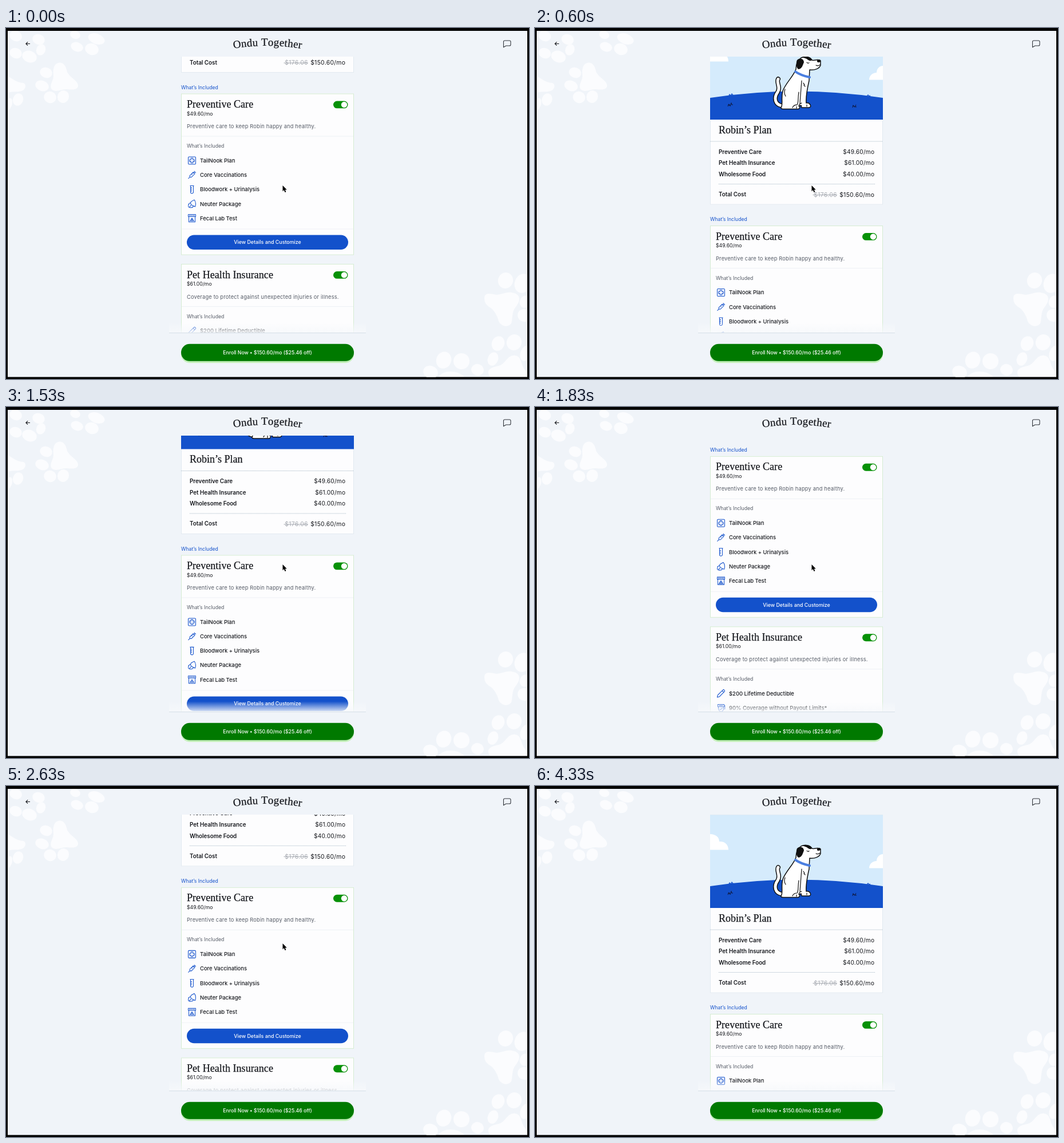
Recreate the animation shown at these times as an HTML page with a canvas. Size 914 by 613 pixels, loop 4.36 s.

```html
<!DOCTYPE html>
<html lang="en">
<head>
<meta charset="utf-8">
<title>Pet plan</title>
<style>
html, body { margin: 0; width: 100%; height: 100%; overflow: hidden; background: #000; }
canvas { display: block; width: 914px; height: 613px; }
</style>
</head>
<body>
<canvas id="stage"></canvas>
<script>
const W = 914, H = 613, LOOP = 4360;
const BG = '#f0f4f9', INK = '#16181d', GREY = '#555b66', BLUE = '#1351cb', CARD = '#fdfdfe';
const LEFT = 306, RIGHT = 608;
const SANS = 'Inter, sans-serif', SERIF = '"Liberation Serif", serif';

const canvas = document.getElementById('stage');
const dpr = window.devicePixelRatio || 1;
canvas.width = W * dpr;
canvas.height = H * dpr;
const c = canvas.getContext('2d');

// Scroll moves: start, end, from, to
const MOVES = [
  [0, 840, 283.5, 0],
  [1193, 1943, 0, 330],
  [2268, 3200, 330, 0]
];

function scrollAt(t) {
  let pos = MOVES[0][2];
  for (const [t0, t1, a, b] of MOVES) {
    if (t < t0) break;
    const u = Math.min(1, (t - t0) / (t1 - t0));
    pos = a + (b - a) * (1 - Math.cos(Math.PI * u)) / 2;
  }
  return pos;
}

function text(str, x, y, size, o = {}) {
  const serif = o.serif;
  c.font = `${o.weight || 400} ${size}px ${serif ? SERIF : SANS}`;
  c.letterSpacing = (o.gap || 0) + 'px';
  c.textAlign = o.align || 'left';
  c.fillStyle = o.color || INK;
  const base = y + size * (serif ? 0.3 : 0.36);
  c.fillText(str, x, base);
  if (serif) {
    c.lineWidth = 0.25;
    c.strokeStyle = c.fillStyle;
    c.strokeText(str, x, base);
  }
}

function box(x, y, w, h, r, fill) {
  c.beginPath();
  c.roundRect(x, y, w, h, r);
  c.fillStyle = fill;
  c.fill();
}

function line(x0, y, x1, color, dash = [], width = 1) {
  c.beginPath();
  c.setLineDash(dash);
  c.moveTo(x0, y);
  c.lineTo(x1, y);
  c.strokeStyle = color;
  c.lineWidth = width;
  c.stroke();
  c.setLineDash([]);
}

function shape(d, fill, stroke, width = 1.5) {
  const p = new Path2D(d);
  if (fill) { c.fillStyle = fill; c.fill(p); }
  if (stroke) {
    c.strokeStyle = stroke;
    c.lineWidth = width;
    c.stroke(p);
  }
}

function oval(x, y, rx, ry, rot, fill) {
  c.beginPath();
  c.ellipse(x, y, rx, ry, rot, 0, 7);
  c.fillStyle = fill;
  c.fill();
}

function card(y0, y1, edge) {
  c.fillStyle = CARD;
  c.fillRect(LEFT, y0, RIGHT - LEFT, y1 - y0);
  c.strokeStyle = edge;
  c.lineWidth = 1;
  c.strokeRect(LEFT + 0.5, y0 + 0.5, RIGHT - LEFT - 1, y1 - y0 - 1);
}

const TOES = [
  [17, 14, 11, 9], [57, 20, 11, 9], [61, 38, 8, 10], [41, 50, 13, 10], [17, 44, 11, 9],
  [124, 33, 11, 8], [150, 37, 12, 10], [158, 19, 15, 9], [121, 12, 9, 7],
  [70, 78, 11, 9], [63, 101, 12, 9], [77, 121, 11, 10], [100, 120, 10, 11],
  [21, 125, 9, 11], [4, 134, 6, 12],
  [873, 441, 13, 14], [903, 446, 14, 17], [907, 478, 9, 11], [906, 502, 12, 11],
  [860, 551, 11, 13], [888, 549, 13, 14], [851, 578, 9, 12], [908, 568, 9, 14],
  [765, 580, 13, 15], [796, 582, 14, 14], [742, 601, 13, 11], [824, 597, 11, 10]
];

function paws() {
  const white = '#fbfcfe';
  for (const [x, y, rx, ry] of TOES) oval(x, y, rx, ry, 0.35, white);
  shape('M91 61C101 58 105 68 107 77C112 87 126 92 126 101C125 110 112 107 104 107C94 108 86 113 80 107C75 101 82 93 83 85C82 75 82 64 91 61Z', white);
  shape('M0 82C10 87 17 95 30 96C37 98 34 108 27 110C17 113 9 109 0 115Z', white);
  shape('M836 472C836 461 847 464 857 466C868 465 876 459 888 463C901 467 898 478 891 487C883 496 886 508 883 516C877 524 865 521 861 512C858 501 853 493 846 488C839 484 836 479 836 472Z', white);
  shape('M846 609C837 597 849 592 861 590C873 588 876 570 890 572C902 574 899 588 907 597L914 609Z', white);
  shape('M756 609C765 596 790 598 801 609Z', white);
}

const ICONS = {
  plus: 'M-6.5-5q0-1.5 1.5-1.5h10q1.5 0 1.5 1.5v10q0 1.5-1.5 1.5h-10q-1.5 0-1.5-1.5ZM-1.6-4.2h3.2v2.6h2.6v3.2h-2.6v2.6h-3.2v-2.6h-2.6v-3.2h2.6Z',
  needle: 'M-6.5 6.5L-3.8 3.8M-3.8 3.8L-3.8 .9L2.2-5L5-2.2L-.9 3.8ZM3.6-3.6L5.4-5.4M3.7-6.8L6.8-3.7M-.8-2l1.5 1.5M1.2-4l1.5 1.5',
  tube: 'M-3.5-6.5h7M-2.5-6.5V4.5a2.5 2.5 0 0 0 5 0V-6.5M-2.5-2.8h2.6M-2.5 0h2.6M-2.5 2.8h2.6',
  cone: 'M-1.5-4L4-7C7-4 7 2 5.5 5L0 2.5C-2.5 1.5-3-2-1.5-4ZM-2-2C-6-1-7 3-6 5.5C-3 7.5 1 7 3 4M-5 1l-1.5-1M-1.8 2.5l-2.5 3',
  jar: 'M-6.5-6.5h13v3.5h-13ZM-3.5-6.5v3.3M0-6.5v3.3M3.5-6.5v3.3M-5.5-3V6.5h11V-3M-3.2 4.5L0-.2L3.2 4.5ZM-1 2.8h2',
  pen: 'M-6.5 6.5L-5.6 2.8L3.4-6.2Q4.6-7.2 5.8-6Q7.2-4.7 6.2-3.4L-2.8 5.6ZM2-4.8L4.8-2',
  shield: 'M-5.5-6h11v4h-11ZM-3.5-4h7M-4.5-2C-5 3-3 5.5 0 7C4 5.5 5 2 4.5-2M-2.2 1.5L-.5 3L2.6-.2M5.5-4h1.3v6h-1.5'
};

function item(icon, label, y) {
  c.save();
  c.translate(325, y);
  shape(ICONS[icon], null, BLUE, 1.05);
  c.restore();
  text(label, 339, y, 9.45, { weight: 500 });
}

function section(top, bottom, title, price, note, items) {
  card(top, bottom, '#d5ecd2');
  text(title, 316, top + 19.2, 18, { serif: true, gap: 0.05 });
  text(price, 316, top + 35, 8.7);
  text(note, 316, top + 57.3, 9.25, { color: GREY, gap: 0.2 });
  line(LEFT + 1, top + 74.5, RIGHT - 1, '#eef1f5');
  text('What’s Included', 316, top + 91.5, 8.7, { color: GREY });
  box(572, top + 13, 25.5, 12.8, 6.4, '#079107');
  oval(591, top + 19.4, 5.2, 5.2, 0, '#fff');
  items.forEach(([icon, label], i) => item(icon, label, top + 117 + i * 25.2));
}

function dog() {
  c.lineJoin = c.lineCap = 'round';
  const tail = 'M432 189C419 187 417 175 424 165C430 156 421 148 425 142';
  shape(tail, null, '#111', 8);
  shape(tail, null, '#fff', 5);
  shape('M456 125C452 137 438 149 433 163C430 174 433 182 431 190Q428 194 433 194.5H460Q464 193 462 189L465 188L466 192H479Q483 191 481 187Q479 183 474 184C473 172 476 158 479 145L480 126C489 127 497 124 499 118L499 110C494 106 488 111 484 109C481 103 472 102 465 105C459 109 456 117 456 125Z', '#fff', '#111', 1.5);
  shape('M466 145L463 184M461 165C459 176 461 183 458 187Q452 187 450 192M437 160C435 165 436 169 438 172M466 184Q461 185 461 190M469 149l2 3l-1 1l2 2M475 187v3M457 190v3', null, '#111', 1.2);
  shape('M455 129C462 134 471 137 480 139', null, '#4b7fe0', 4);
  oval(479, 139, 1.8, 1.8, 0, '#4b7fe0');
  shape('M458 109C463 104 470 107 470 113C468 117 467 124 461 125C456 124 456 113 458 109Z', '#111');
  shape('M467 104C474 102 481 103 484 108C483 112 478 110 475 107Z', '#111');
  shape('M475 113q2 2.5 4 .5M491 118q4 2 7-1', null, '#111', 1.1);
  oval(496, 110.5, 3.2, 2.4, -0.2, '#111');
}

function hero() {
  c.save();
  c.beginPath();
  c.rect(LEFT, 50.5, RIGHT - LEFT, 162.5);
  c.clip();
  c.fillStyle = '#d5ebfc';
  c.fillRect(LEFT, 50, RIGHT - LEFT, 163);
  shape('M306 84C315 84 322 89 322 97C331 96 338 102 338 111.5H306Z', '#fff');
  shape('M584 143.5C584 136 590 131 597 131C597 124 602 119 608 119V143.5Z', '#fff');
  shape('M306 175Q457 152 608 175V214H306Z', BLUE);
  shape('M339 171l1-2l2 2l2-3l2 2M580 172l2-2l2 2l2-1', null, BLUE, 1.3);
  shape('M337 190l2-4l2 3l2-5l1 3l2 0M337 187l5 2M555 192l1-4l3 3l2-4M555 189l7 2', null, '#101d4a', 1.1);
  dog();
  c.restore();
}

const COSTS = [
  ['Preventive Care', '$49.60/mo'],
  ['Pet Health Insurance', '$61.00/mo'],
  ['Wholesome Food', '$40.00/mo']
];
const CARE = [
  ['plus', 'TailNook Plan'], ['needle', 'Core Vaccinations'],
  ['tube', 'Bloodwork + Urinalysis'], ['cone', 'Neuter Package'], ['jar', 'Fecal Lab Test']
];
const COVER = [['pen', '$200 Lifetime Deductible'], ['shield', '90% Coverage without Payout Limits*']];

function content() {
  card(50, 361.5, '#e2eaf0');
  hero();
  text('Robin’s Plan', 321, 231.5, 18, { serif: true });
  line(LEFT, 251, RIGHT, '#a4b6c4', [1, 1]);
  COSTS.forEach(([name, cost], i) => {
    const y = 269 + i * 19.6;
    text(name, 321, y, 9.8, { weight: 600 });
    text(cost, 593.3, y, 10.2, { align: 'right', gap: 0.2 });
  });
  line(321, 325.5, 594, '#a4b6c4', [1, 1]);
  text('Total Cost', 321, 343.5, 9.8, { weight: 600 });
  text('$150.60/mo', 593.3, 344, 10.4, { align: 'right', gap: 0.3 });
  text('$176.06', 527.8, 344, 10.4, { align: 'right', gap: 0.3, color: '#a5a9b0' });
  line(485.5, 344.5, 528, '#a5a9b0');

  text('What’s Included', LEFT, 387, 8.6, { color: BLUE });
  section(398, 680, 'Preventive Care', '$49.60/mo',
    'Preventive care to keep Robin happy and healthy.', CARE);
  line(LEFT + 1, 634.5, RIGHT - 1, '#f0f2f6');
  box(316, 645, 282, 25.5, 12.75, BLUE);
  text('View Details and Customize', 457, 657.6, 8.85, { weight: 500, align: 'center', color: '#fff' });
  section(695.5, 1000, 'Pet Health Insurance', '$61.00/mo',
    'Coverage to protect against unexpected injuries or illness.', COVER);
}

// Letters set along a shallow arc
function arcTitle(str, cx, top, size, radius, gap) {
  c.font = `${size}px ${SERIF}`;
  c.letterSpacing = '0px';
  c.textAlign = 'center';
  const widths = [...str].map(ch => c.measureText(ch).width + gap);
  let x = -widths.reduce((a, b) => a + b, 0) / 2;
  [...str].forEach((ch, i) => {
    c.save();
    c.translate(cx, top + radius);
    c.rotate((x + widths[i] / 2) / radius);
    c.fillStyle = c.strokeStyle = INK;
    c.lineWidth = 0.25;
    c.fillText(ch, 0, -radius);
    c.strokeText(ch, 0, -radius);
    c.restore();
    x += widths[i];
  });
}

function header() {
  shape('M42 27.5H34.8M38 24.3L34.8 27.5L38 30.7', null, INK, 1.1);
  shape('M871.5 22H880Q882 22 882 24V29Q882 31 880 31H874L869.5 33.5V24Q869.5 22 871.5 22Z', null, '#30343b', 1.1);
  arcTitle('Ondu Together', 457, 31, 19, 360, 0.3);
}

function footer() {
  const fade = c.createLinearGradient(0, 514, 0, 532);
  fade.addColorStop(0, 'rgba(248,250,252,0)');
  fade.addColorStop(1, 'rgba(246,248,251,0.85)');
  c.fillStyle = fade;
  c.fillRect(285, 514, 344, 18);
  line(285, 532.5, 629, '#d6dfe7');
  box(LEFT, 555, 302, 30, 15, '#c3efb9');
  box(LEFT, 551.8, 302, 30, 15, '#007900');
  text('Enroll Now • $150.60/mo ($25.46 off)', 457, 566.8, 8.7, { weight: 500, align: 'center', color: '#fff' });
}

// The pointer rests, then leaves through the top edge
function pointer(t) {
  const u = Math.min(1, Math.max(0, (t - 3000) / 200));
  c.save();
  c.translate(483.5, 275 - 295 * u * u);
  shape('M0 0V10.2L2.3 8.1L4 12.1L5.9 11.3L4.2 7.4H7.3Z', '#000', '#fff', 1.4);
  shape('M0 0V10.2L2.3 8.1L4 12.1L5.9 11.3L4.2 7.4H7.3Z', '#000');
  c.restore();
}

function draw(t) {
  c.setTransform(dpr, 0, 0, dpr, 0, 0);
  c.fillStyle = '#000';
  c.fillRect(0, 0, W, H);
  c.save();
  c.beginPath();
  c.rect(3, 5, 908, 604.5);
  c.clip();
  c.fillStyle = BG;
  c.fillRect(0, 0, W, H);
  paws();

  c.save();
  c.beginPath();
  c.rect(285, 50, 344, 482);
  c.clip();
  c.translate(0, -scrollAt(t));
  content();
  c.restore();

  header();
  footer();
  c.restore();
  pointer(t);
}

const start = performance.now();
function tick() {
  draw((performance.now() - start) % LOOP);
  requestAnimationFrame(tick);
}
tick();
</script>
</body>
</html>
```
